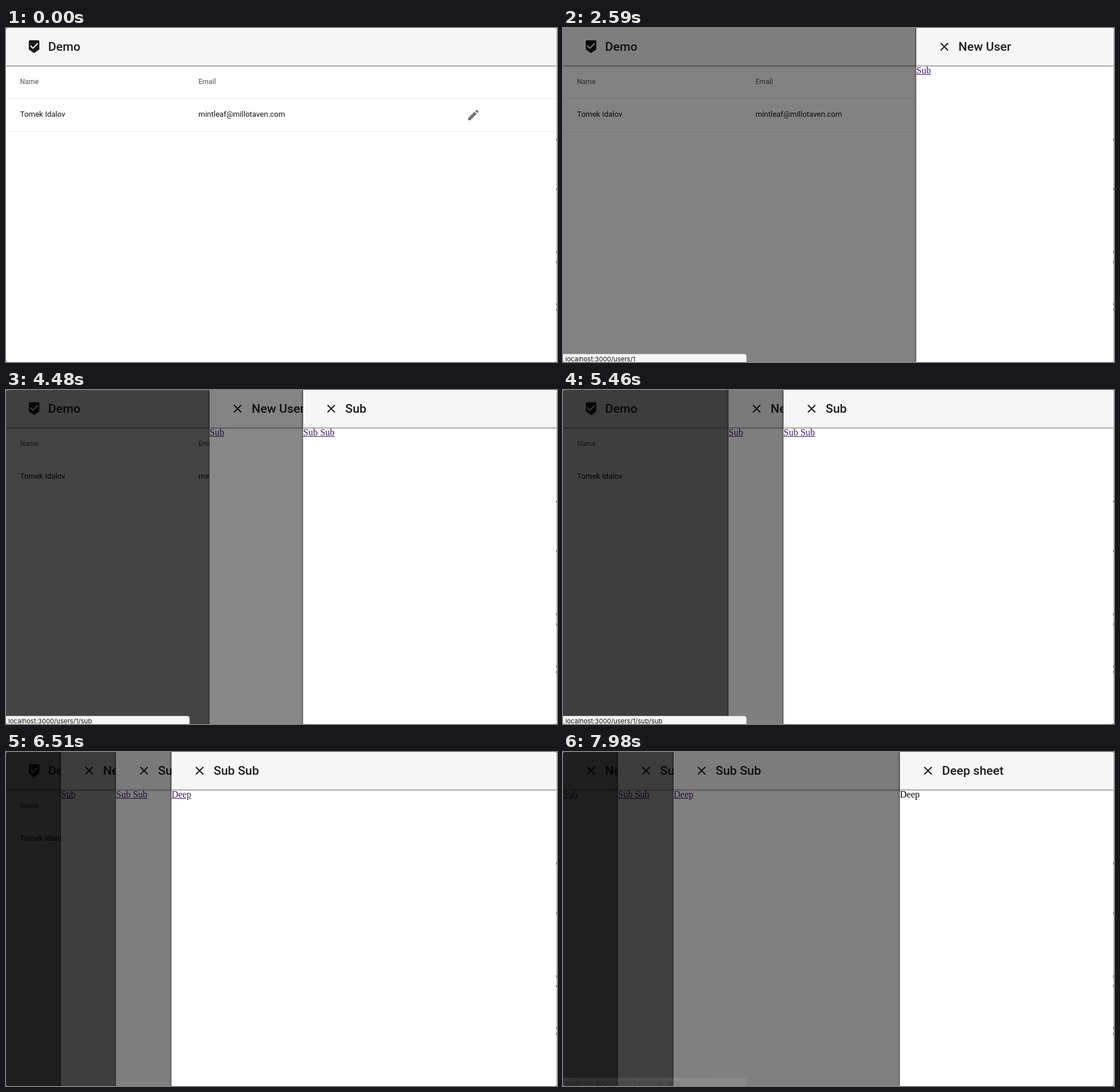
An HTML page that plays this animation: 942x572 px, repeating every 8 s.

```html
<!DOCTYPE html>
<html lang="en">
<head>
<meta charset="utf-8">
<title>Nested sheets</title>
<style>
html, body { margin: 0; width: 100%; height: 100%; overflow: hidden; background: #777; }
#stage { position: absolute; left: 0; top: 0; width: 942px; height: 572px; overflow: hidden; border-radius: 4px; background: #fff; font-family: Roboto, sans-serif; }
#stage div, #stage span, #stage svg { position: absolute; white-space: nowrap; }
.bar { left: 0; top: 0; width: 100%; height: 64px; background: #f6f6f6; box-shadow: 0 1px 3px rgba(0,0,0,.6); }
.bar svg { left: 36px; top: 20px; fill: #1a1a1a; }
.bar span { left: 72px; top: 20px; font: 500 21px/24px Roboto, sans-serif; color: #1c1c1c; }
.cell { font-size: 13px; line-height: 16px; top: 140px; color: #141414; }
.head { font-size: 12px; font-weight: 500; top: 84px; color: #757575; }
.rule { left: 0; width: 942px; height: 1px; background: #ebebeb; }
#edit { left: 787px; top: 137px; fill: #757575; }
#halo { left: 775px; top: 125px; width: 48px; height: 48px; border-radius: 50%; background: rgba(0,0,0,.06); }
.shade { left: 0; top: 0; width: 942px; height: 572px; background: #000; }
.sheet { left: 0; top: 0; height: 572px; background: #fff; box-shadow: 0 0 4px rgba(0,0,0,.55); }
.body { left: 0; top: 64px; font: 16px/18px "Liberation Serif", Times, serif; color: #000; }
.link { color: #401a66; text-decoration: underline; }
#status { left: -1px; top: 558px; width: 313px; height: 20px; background: #f6f6f6; border: 1px solid #c4c4c4; border-radius: 0 4px 0 0; }
#status span { left: 4px; top: 1px; font: 11px/15px Inter, sans-serif; letter-spacing: .04px; color: #111; }
#edge { left: 941px; top: 4px; width: 1px; height: 564px; background: #b4b4b4; }
#edge div { left: 0; width: 1px; height: 4px; background: #333; }
</style>
</head>
<body>
<div id="stage">
  <div class="bar">
    <svg width="24" height="24" viewBox="0 0 24 24"><path d="M19 1H5c-1.1 0-2 .9-2 2v12.9c0 .7.35 1.3.9 1.7L12 23l8.1-5.4c.55-.4.9-1 .9-1.7V3c0-1.1-.9-2-2-2zm-9 15l-5-5 1.4-1.4 3.6 3.6 7.6-7.6L19 7l-9 9z"/></svg>
    <span>Demo</span>
  </div>
  <span class="cell head" style="left:24px">Name</span>
  <span class="cell head" style="left:329px">Email</span>
  <div class="rule" style="top:120px"></div>
  <span class="cell" style="left:24px">Tomek Idalov</span>
  <span class="cell" style="left:329px">mintleaf@millotaven.com</span>
  <div class="rule" style="top:177px"></div>
  <div id="halo"></div>
  <svg id="edit" width="24" height="24" viewBox="0 0 24 24"><path d="M3 17.25V21h3.75L17.8 9.94l-3.75-3.75L3 17.25zM20.7 7.04a1 1 0 0 0 0-1.41l-2.34-2.34a1 1 0 0 0-1.41 0l-1.83 1.83 3.75 3.75 1.83-1.83z"/></svg>
  <div id="sheets"></div>
  <div id="edge"></div>
  <div id="status"><span></span></div>
</div>
<script>
const W = 942, LOOP = 8000, STEP = 70;
const $ = id => document.getElementById(id);

// width and push are shares of the stage; hover is when the link status shows up
const sheets = [
  { title: 'New User', text: 'Sub', width: .4, push: 0, start: 2327, hover: 1960, path: '' },
  { title: 'Sub', text: 'Sub Sub', width: .6, push: .3, start: 4290, hover: 3780, path: '/sub' },
  { title: 'Sub Sub', text: 'Deep', width: .7, push: .2, start: 5978, hover: 5250, path: '/sub/sub' },
  { title: 'Deep sheet', text: 'Deep', width: .4, push: .1, start: 7613, hover: 7070, path: '/sub/sub/deep' }
];

const clamp = v => Math.min(1, Math.max(0, v));
const spring = t => t <= 0 ? 0 : t > .46 ? 1 : 1 - (1 + 14.7 * t) * Math.exp(-14.7 * t);
const pushEase = t => t <= 0 ? 0 : 1 - (1 - clamp((t + .0226) / .409)) ** 2;
const dim = t => t <= 0 ? 0 : t > .46 ? 1 : 1 - Math.exp(-23 * t ** 1.3);

function add(parent, cls, html = '') {
  const el = document.createElement('div');
  el.className = cls;
  el.innerHTML = html;
  parent.append(el);
  return el;
}

sheets.forEach((s, i) => {
  s.shade = add($('sheets'), 'shade');
  s.el = add($('sheets'), 'sheet', `
    <div class="bar">
      <svg width="24" height="24" viewBox="0 0 24 24"><path d="M19 6.41L17.59 5 12 10.59 6.41 5 5 6.41 10.59 12 5 17.59 6.41 19 12 13.41 17.59 19 19 17.59 13.41 12z"/></svg>
      <span>${s.title}</span>
    </div>
    <div class="body${i < 3 ? ' link' : ''}">${s.text}</div>`);
  s.el.style.width = Math.round(s.width * W) + 'px';
});

for (const y of [186, 271, 379, 396, 468, 478]) add($('edge'), '').style.top = y - 1 + 'px';

const label = $('status').firstElementChild;
const rules = document.querySelectorAll('.rule');

function draw(ms) {
  let pushed = 0, opacity = 0;
  for (let i = sheets.length - 1; i >= 0; i--) {
    const s = sheets[i], t = (ms - s.start) / 1000;
    const x = W * (1 - s.width * spring(t) - pushed);
    s.el.style.visibility = t > 0 ? 'visible' : 'hidden';
    s.el.style.transform = `translateX(${Math.round(x)}px)`;
    s.shade.style.opacity = .5 * dim(t);
    pushed += s.push * pushEase(t);

    const shown = clamp((ms - s.hover + STEP) / 140) * clamp((.374 - t) / .08);
    if (shown > 0) {
      opacity = shown;
      label.textContent = 'localhost:3000/users/1' + s.path;
    }
  }
  $('status').style.opacity = opacity;
  $('halo').style.opacity = clamp((ms - 1890) / 140);
  rules.forEach(r => r.style.opacity = ms < 2700 ? 1 : 0);
}

function tick() {
  const ms = performance.now() % LOOP;
  draw(Math.floor(ms / STEP) * STEP);
  requestAnimationFrame(tick);
}
tick();
</script>
</body>
</html>
```
